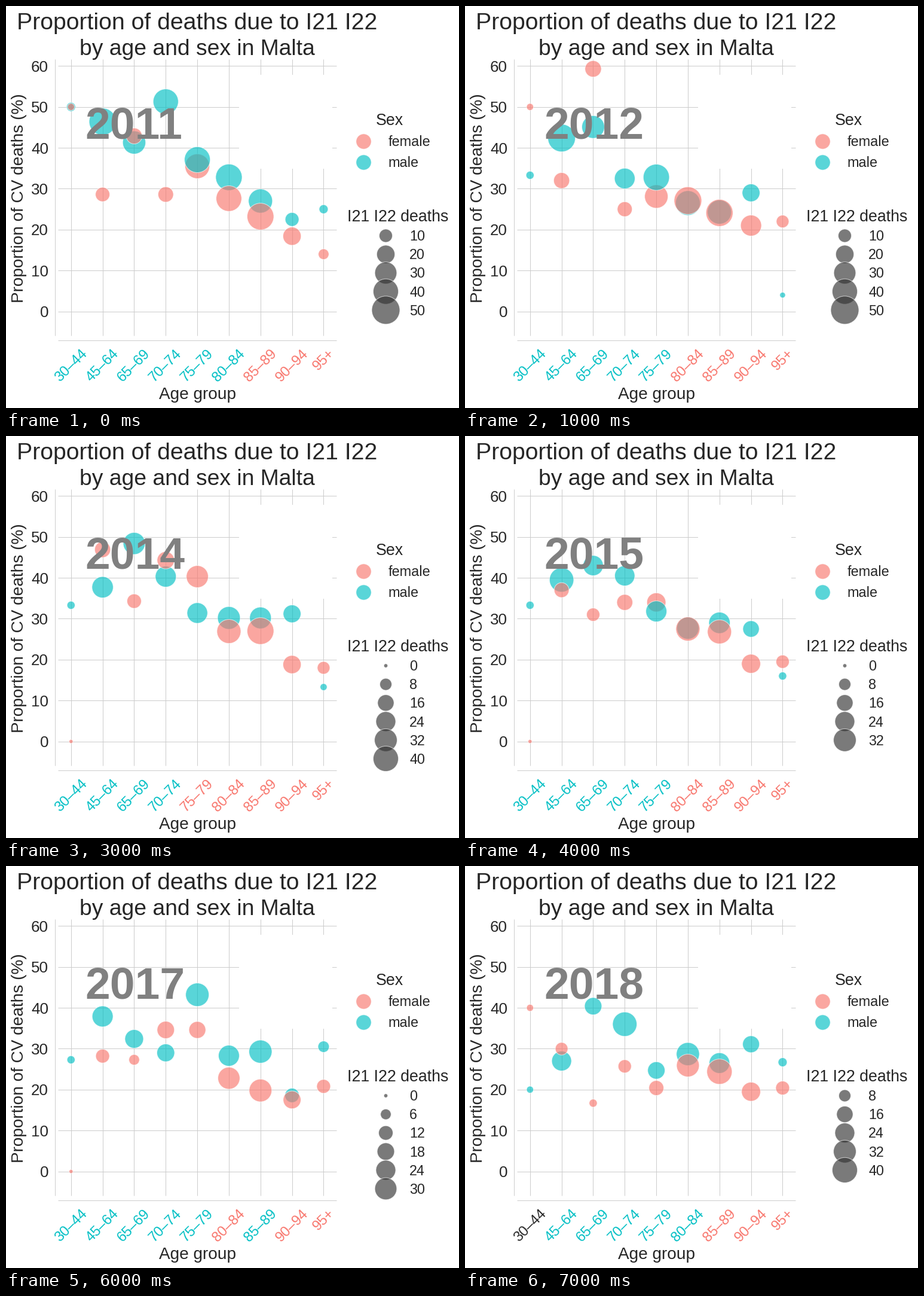
A matplotlib script that plays this animation: 758x672 px, repeating every 8000 ms.

```python
import matplotlib.pyplot as plt
import numpy as np
from matplotlib.animation import FuncAnimation
from matplotlib.colors import to_rgba
from matplotlib.patches import Rectangle

W, H, DPI = 758, 672, 100
PT = 72 / DPI  # points per pixel
INK, GRID, GREY = "#262626", "#cccccc", "#808080"
FEMALE, MALE = "#f8766d", "#00bfc4"
ALPHA = 0.65
AGES = ["30–44", "45–64", "65–69", "70–74", "75–79",
        "80–84", "85–89", "90–94", "95+"]
AGE_X = 108.8 + 52.83 * np.arange(len(AGES))
MALE_ON_TOP = 4  # age group whose male bubble is drawn last

years = []


def add_year(female, female_n, male, male_n, legend):
    """Store percentages, death counts and the size legend of one year."""
    years.append(dict(female=female, female_n=female_n,
                      male=male, male_n=male_n, legend=list(legend)))


# 2011 to 2018
add_year([50, 28.6, 42.9, 28.6, 35.5, 27.6, 23.2, 18.4, 14],
         [2, 12, 15, 14, 38, 41, 45, 20, 6],
         [50, 46.4, 41.3, 51.3, 37.1, 32.8, 27, 22.5, 25],
         [4, 46, 33, 40, 42, 44, 36, 11, 4], range(10, 51, 10))
add_year([50, 32, 59.3, 25, 28.1, 27.1, 24.1, 21, 22],
         [2, 15, 16, 13, 34, 48, 46, 27, 9],
         [33.3, 42.4, 45.1, 32.5, 32.8, 26.5, 24.3, 29, 4],
         [3, 48, 32, 26, 43, 38, 36, 19, 1], range(10, 51, 10))
add_year([0, 34, 42, 33, 31, 27.5, 25, 20, 19],
         [0, 14, 14, 16, 32, 38, 42, 23, 9],
         [42.9, 40, 53, 37, 32, 28.5, 27, 28, 12],
         [6, 40, 32, 28, 36, 39, 34, 18, 2], range(0, 41, 8))
add_year([0, 46.9, 34.3, 44.3, 40.3, 26.9, 27, 18.8, 18],
         [0, 15, 12, 18, 30, 36, 45, 20, 9],
         [33.3, 37.7, 48.4, 40.3, 31.4, 30.2, 30.2, 31.2, 13.3],
         [3, 28, 30, 27, 26, 32, 29, 19, 2], range(0, 41, 8))
add_year([0, 37, 31, 34, 34, 27.5, 26.8, 19, 19.5],
         [0, 13, 10, 15, 22, 36, 36, 22, 10],
         [33.3, 39.5, 43, 40.5, 31.8, 27.7, 29, 27.5, 16],
         [3, 37, 25, 25, 27, 30, 28, 16, 3], range(0, 33, 8))
add_year([33.3, 30, 27.6, 27.1, 30, 28.3, 26.5, 18.9, 20.7],
         [1, 12, 8, 13, 18, 41, 40, 23, 12],
         [28.6, 41.1, 39.2, 40.7, 32.1, 25.2, 28.3, 24.6, 19],
         [2, 29, 20, 23, 26, 28, 26, 14, 4], range(8, 41, 8))
add_year([0, 28.2, 27.3, 34.6, 34.6, 22.8, 19.8, 17.5, 20.8],
         [0, 11, 6, 18, 17, 30, 32, 19, 11],
         [27.3, 37.9, 32.4, 29, 43.2, 28.3, 29.3, 18.6, 30.5],
         [3, 27, 21, 19, 34, 27, 33, 12, 7], range(0, 31, 6))
add_year([40, 30, 16.7, 25.7, 20.4, 25.9, 24.4, 19.5, 20.4],
         [2, 9, 3, 10, 13, 32, 40, 22, 11],
         [20, 27, 40.4, 36, 24.7, 28.7, 26.5, 31.1, 26.7],
         [2, 24, 18, 37, 18, 33, 26, 17, 4], range(8, 41, 8))

fig = plt.figure(figsize=(W / DPI, H / DPI), dpi=DPI, facecolor="white")
ax = fig.add_axes([0, 0, 1, 1])
ax.set(xlim=(0, W), ylim=(H, 0))
ax.axis("off")


def pct_y(pct):
    return 510.6 - 6.838 * np.asarray(pct)


def bubble_size(n):
    """Marker area in square points for a number of deaths."""
    radius = np.sqrt(8 + 10.5 * np.asarray(n)) + 0.4
    return (2 * radius * PT) ** 2


def text(x, y, label, px, color=INK, ha="center", va="baseline", **kw):
    return ax.text(x, y, label, fontsize=px * PT, color=color, ha=ha, va=va,
                   family="Liberation Sans", **kw)


def line(xs, ys):
    ax.plot(xs, ys, color=GRID, lw=PT, solid_capstyle="butt", zorder=0)


def bubbles(x, y, sizes, colors, z=1):
    return ax.scatter(x, y, s=sizes, c=colors, edgecolors=[(1, 1, 1, ALPHA)],
                      linewidths=PT, zorder=z)


# Titles and axes
text(320, 39, "Proportion of deaths due to I21 I22", 39.2)
text(320, 82, "by age and sex in Malta", 37.2)
text(320, 657, "Age group", 28)
text(22, 321, "Proportion of CV deaths (%)", 28, va="center", rotation=90)
for pct in range(0, 61, 10):
    y = pct_y(pct)
    line([87, 552.5], [y, y])
    text(71, y, str(pct), 26, ha="right", va="center_baseline")
for x in AGE_X:
    line([x, x], [89, 551])
line([81.5, 81.5], [89, 551])
line([87, 552.5], [558.5, 558.5])
ticks = [text(x, 570, age, 23.8, va="top", rotation=45)
         for x, age in zip(AGE_X, AGES)]
ax.add_patch(Rectangle((390, 115), 156, 157, fc="white", lw=0, zorder=2))

# Sex legend
text(642, 199, "Sex", 26.8)
for y, name, color in [(225.5, "female", FEMALE), (260.5, "male", MALE)]:
    bubbles([597.5], [y], [(25.4 * PT) ** 2], [to_rgba(color, ALPHA)])
    text(639.5, y + 8.5, name, 23.5, ha="left")

# Size legend
text(655.5, 360, "I21 I22 deaths", 26.8)
KEY_Y = 384 + 31.1 * np.arange(6)
key_dots = bubbles([635.5], [384], [1], [to_rgba("#333333", ALPHA)])
key_labels = [text(675, y + 8.3, "", 23.4, ha="left") for y in KEY_Y]

dots = bubbles([0], [0], [1], [to_rgba(MALE, ALPHA)])
year_label = text(132, 222, "", 75, GREY, ha="left", weight="bold", zorder=3)


def draw(i):
    d = years[i]
    points, counts, colors = [], [], []
    for g, x in enumerate(AGE_X):
        pair = [("male", MALE), ("female", FEMALE)]
        if g == MALE_ON_TOP:
            pair.reverse()
        for sex, color in pair:
            points.append((x, pct_y(d[sex][g])))
            counts.append(d[sex + "_n"][g])
            colors.append(to_rgba(color, ALPHA))
        # The tick takes the colour of the sex with more deaths
        lead = d["male_n"][g] - d["female_n"][g]
        ticks[g].set_color(MALE if lead > 0 else FEMALE if lead < 0 else INK)
    dots.set_offsets(points)
    dots.set_sizes(bubble_size(counts))
    dots.set_facecolors(colors)

    key = d["legend"]
    key_dots.set_offsets([(635.5, y) for y in KEY_Y[:len(key)]])
    key_dots.set_sizes(bubble_size(key))
    for k, label in enumerate(key_labels):
        label.set_text(str(key[k]) if k < len(key) else "")
    year_label.set_text(str(2011 + i))
    return [dots, key_dots, year_label, *ticks, *key_labels]


anim = FuncAnimation(fig, draw, frames=len(years), interval=1000,
                     repeat=True, repeat_delay=0, blit=False)
plt.show()
```
